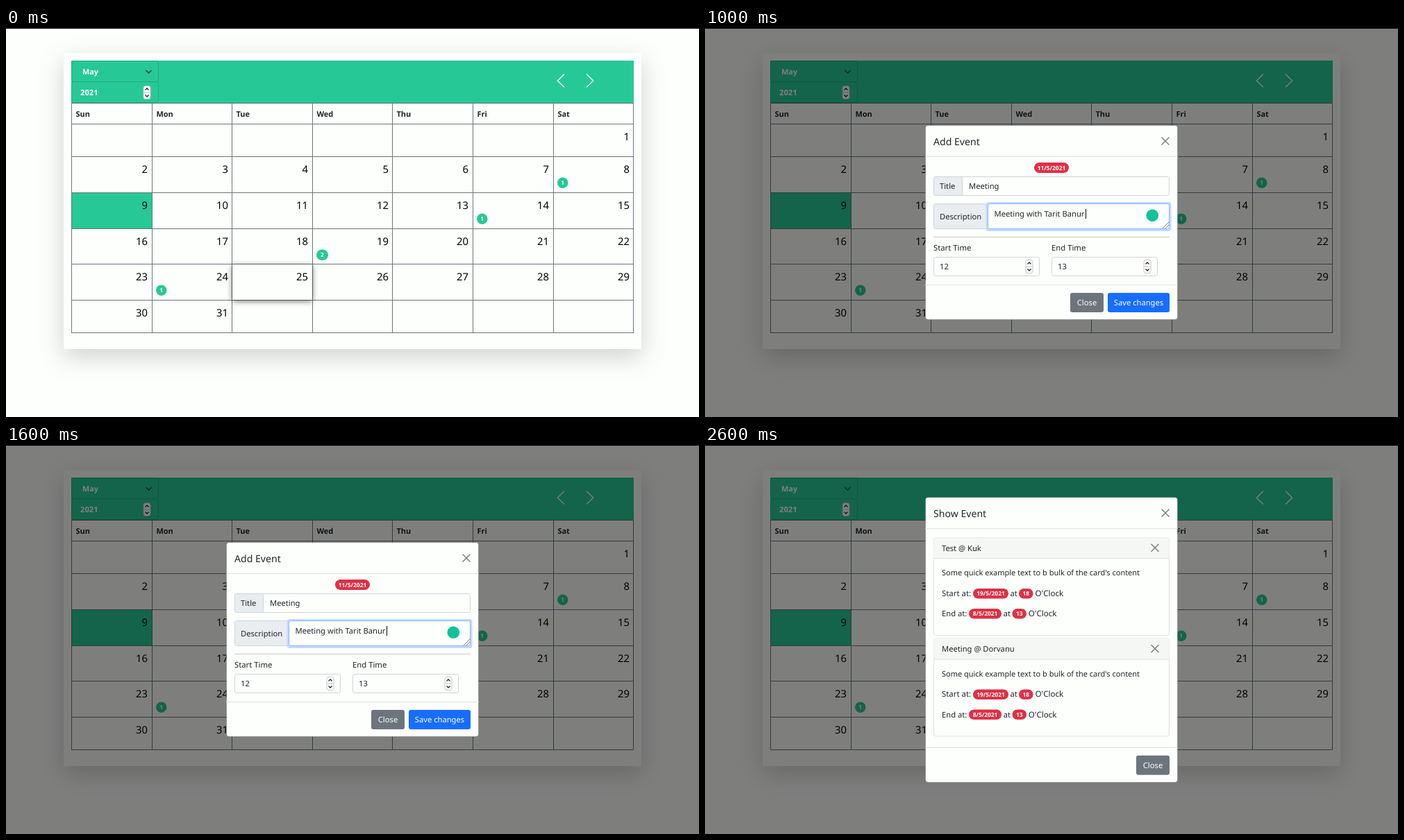
Recreate the animation shown at these times as an HTML page. Size 998 by 561 pixels, loop 3000 ms.

```html
<!DOCTYPE html>
<html lang="en">
<head>
<meta charset="utf-8">
<title>Event calendar</title>
<style>
  html, body { margin: 0; width: 100%; height: 100%; overflow: hidden; background: #fdfffc; }
  svg { display: block; font: 11.2px "Noto Sans", sans-serif; fill: #212529; text-rendering: geometricPrecision; }
  path { fill: none; }
</style>
</head>
<body>
<svg id="stage" width="998" height="561" viewBox="0 0 998 561"></svg>
<script>
const PAPER = '#fdfffc', GREEN = '#26c996', RED = '#df3045', GRID = '#6c757d', LINE = '#dee2e0', FIELD = '#ced4da';

const rect = (x, y, w, h, fill, extra = '') =>
  `<rect x="${x}" y="${y}" width="${w}" height="${h}" fill="${fill}" ${extra}/>`;
const box = (x, y, w, h, fill, stroke, r = 3) =>
  rect(x + .5, y + .5, w - 1, h - 1, fill, `rx="${r}" stroke="${stroke}"`);
const text = (x, y, str, extra = '') => `<text x="${x}" y="${y}" ${extra}>${str}</text>`;
const path = (d, color, width = 1) => `<path d="${d}" stroke="${color}" stroke-width="${width}"/>`;
const bold = size => `font-size="${size}" font-weight="600"`;

const cross = (x, y) => path(`M${x - 5.5} ${y - 5.5}l11 11m0-11l-11 11`, '#7d7f7d', 1.5);
const pill = (x, y, w, h, str, fill = RED) =>
  rect(x, y, w, h, fill, `rx="${h / 2}"`) +
  text(x + w / 2, y + h / 2 + 3.1, str, `font-size="8.4" font-weight="700" fill="#fff" text-anchor="middle"`);
const spinner = (x, y) =>
  box(x, y, 11, 20, '#fff', '#c4c6c4') +
  path(`M${x + 1} ${y + 10}h9`, '#c4c6c4') +
  path(`M${x + 3} ${y + 6.5}l2.5-2.5l2.5 2.5m-5 7l2.5 2.5l2.5-2.5`, '#222', 1.3);
const button = (x, y, w, label, fill) =>
  rect(x, y, w, 28, fill, 'rx="3"') +
  text(x + w / 2, y + 18, label, 'fill="#fff" text-anchor="middle"');

function calendar() {
  const colX = i => Math.round(94 + 115.6 * i);
  const rowY = [108, 138, 185, 237, 289, 340, 392, 439];
  const events = { 8: 1, 14: 1, 19: 2, 24: 1 };
  const cellX = day => colX((day + 5) % 7);
  const cellY = day => rowY[1 + Math.floor((day + 5) / 7)];

  let out = rect(83, 36, 832, 427, PAPER, 'filter="url(#cardShadow)"') +
    rect(94, 47, 810, 61, GREEN) +
    box(94, 47, 126, 31, 'none', '#1eac7f') + box(94, 77, 126, 31, 'none', '#1eac7f') +
    text(110, 67, 'May', `${bold(10.9)} fill="#fff"`) +
    text(107, 97, '2021', `${bold(11.2)} fill="#fff"`) +
    path('M201.5 61l4 4l4-4', '#343a40', 1.5) + spinner(197.5, 83) +
    path('M804 66.5l-9.7 9.5l9.7 9.5M836 66.5l9.7 9.5l-9.7 9.5', '#fff', 1.3) +
    rect(cellX(9), cellY(9), 116, 52, GREEN);

  for (const y of rowY) out += rect(94, y, 810, 1, GRID);
  for (let i = 0; i < 8; i++) out += rect(colX(i), 108, 1, 332, GRID);
  out += rect(cellX(25) + 1, cellY(25) + 1, 115, 51, PAPER, 'filter="url(#cellShadow)"');

  ['Sun', 'Mon', 'Tue', 'Wed', 'Thu', 'Fri', 'Sat'].forEach((name, i) => {
    out += text(colX(i) + 6.4, 128, name, bold(11));
  });
  for (let day = 1; day <= 31; day++) {
    const x = cellX(day), y = cellY(day);
    out += text(x + 110, y + 23.6, day, 'font-size="14.8" text-anchor="end" fill="#000"');
    if (events[day]) out += pill(x + 6, y + 30.5, events[day] > 1 ? 17 : 15.5, 15.5, events[day], GREEN);
  }
  return out;
}

// Panel with a title bar and a footer rule
const modal = (y, h, title) =>
  box(317, y, 364, h, PAPER, 'rgba(0,0,0,.2)', 4) +
  text(329, y + 28.6, title, 'font-size="14.1"') + cross(663, y + 23) +
  rect(317, y + 45, 364, 1, LINE) + rect(317, y + h - 51, 364, 1, LINE);

const timeField = (x, label, value) =>
  text(x, 320.5, label, 'font-size="11.3"') + box(x, 330, 153, 28, PAPER, FIELD) +
  text(x + 9, 348.3, value) + spinner(x + 132.5, 334);

const addEvent = () => modal(140, 281, 'Add Event') +
  pill(474, 194, 50, 15, '11/5/2021') +
  box(329, 214, 340, 28, PAPER, FIELD) + box(329, 214, 42, 28, '#e9edf0', FIELD) +
  text(338, 232.2, 'Title') + text(380, 232.2, 'Meeting') +
  box(329, 253, 81, 37, '#e9edf0', FIELD) + text(338, 276, 'Description') +
  rect(404.5, 251, 267, 42, '#c2daff', 'rx="4"') + box(407, 253, 262, 37, PAPER, '#86b7fe') +
  text(416.5, 271.8, 'Meeting with Tarit Banur') + rect(548, 261, 1, 14, '#000') +
  `<circle cx="644.3" cy="270.3" r="8.8" fill="#11c39a"/>` +
  path('M659 289l9.5-9.5m-5.5 9.5l5.5-5.5', '#777') +
  rect(329, 301, 340, 1, '#c5c8c8') +
  timeField(329, 'Start Time', 12) + timeField(499, 'End Time', 13) +
  button(526, 382, 48, 'Close', GRID) + button(580, 382, 89, 'Save changes', '#176dfd');

const eventCard = (y, title) =>
  box(329, y, 340, 142, PAPER, LINE) + rect(329.5, y + .5, 339, 30, '#f5f7f5') +
  rect(329, y + 30, 340, 1, LINE) +
  text(341, y + 19.5, title) + cross(648, y + 15.3) +
  text(341, y + 55.3, "Some quick example text to b bulk of the card's content", 'font-size="10.98"') +
  text(341, y + 84.7, 'Start at:', 'font-size="11.4"') + pill(386, y + 74, 51, 14.5, '19/5/2021') +
  text(439.5, y + 84.7, 'at') + pill(452, y + 74, 20.5, 14.5, 18) +
  text(475.5, y + 84.7, "O'Clock", 'font-size="11.6"') +
  text(341, y + 114, 'End at:') + pill(380, y + 103, 47, 14.5, '8/5/2021') +
  text(429.7, y + 114, 'at') + pill(442.5, y + 103, 20.5, 14.5, 13) +
  text(465.8, y + 114, "O'Clock", 'font-size="11.6"');

const showEvent = () => modal(75, 412, 'Show Event') +
  eventCard(133, 'Test @ Kuk') + eventCard(278.5, 'Meeting @ Dorvanu') +
  button(621, 447.7, 48, 'Close', GRID);

const shadow = (id, dy, blur, alpha) =>
  `<filter id="${id}" x="-50%" y="-50%" width="200%" height="200%" color-interpolation-filters="sRGB">
    <feDropShadow dx="0" dy="${dy}" stdDeviation="${blur}" flood-opacity="${alpha}"/></filter>`;

document.getElementById('stage').innerHTML =
  shadow('cardShadow', 11.6, 17.5, .175) + shadow('cellShadow', 2, 4.5, .55) +
  rect(0, 0, 998, 561, PAPER) + calendar() +
  `<g id="dim">${rect(0, 0, 998, 561, 'rgba(0,0,0,.5)')}</g>` +
  `<g id="add">${addEvent()}</g><g id="show">${showEvent()}</g>` +
  rect(0, 0, 998, 1, '#000');

const [dim, add, show] = ['dim', 'add', 'show'].map(id => document.getElementById(id));
const toggle = (el, on) => { el.style.display = on ? 'inline' : 'none'; };

function tick() {
  const scene = Math.floor(performance.now() % 3000 / 1000);
  toggle(dim, scene > 0);
  toggle(add, scene === 1);
  toggle(show, scene === 2);
  requestAnimationFrame(tick);
}
tick();
</script>
</body>
</html>
```
